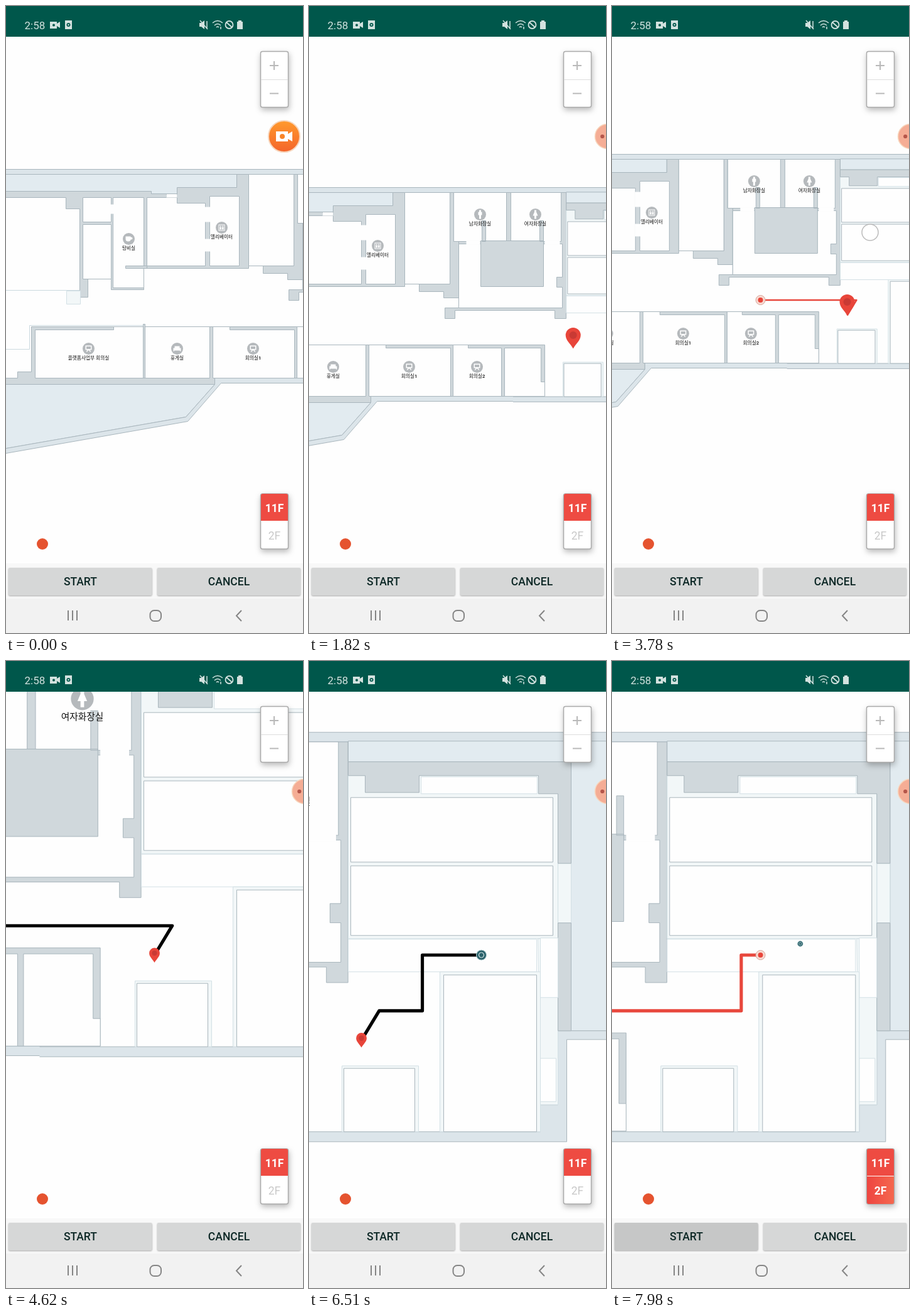
An HTML page that plays this animation: 473x1000 px, repeating every 8 s.

```html
<!DOCTYPE html>
<html lang="ko">
<head>
<meta charset="utf-8">
<title>Indoor route</title>
<style>
html, body { margin: 0; width: 100%; height: 100%; overflow: hidden; background: #fefefe; }
svg { display: block; width: 473px; height: 1000px; font-family: Roboto, "Noto Sans CJK KR", "Noto Sans CJK", sans-serif; }
#map path { vector-effect: non-scaling-stroke; stroke: #a9b6bd; stroke-width: 1; }
#map .wall { fill: #d0d8dc; }
#map .strip { fill: #dce5ea; }
#map .blue { fill: #e2ebf0; }
#map .pale { fill: #f2f7f8; stroke: #d3e0e5; }
#map .room { fill: #fefefe; }
#map .gap { fill: #fefefe; stroke: none; }
#map .thin { fill: none; stroke: #cbd9df; }
#map text { font-size: 7.7px; font-weight: 500; fill: #111; text-anchor: middle; }
.glyph { fill: #fff; }
#route { fill: none; stroke-width: 2.7; stroke-linejoin: round; }
.card { filter: drop-shadow(1px 4px 5px #0004); }
.mid { text-anchor: middle; }
.key { font-size: 17.5px; font-weight: 500; fill: #0d2826; }
.raised { filter: drop-shadow(0 1px 1px #0005); }
</style>
</head>
<body>
<svg viewBox="0 0 473 1000">
<defs>
  <linearGradient id="orange" x2="0" y2="1"><stop stop-color="#ff9a2e"/><stop offset="1" stop-color="#f4642a"/></linearGradient>
  <linearGradient id="lit"><stop stop-color="#ee4540"/><stop offset="1" stop-color="#f5684f"/></linearGradient>
  <path id="cup" d="M-5-4H3V-3Q6-3 6-1T3 1Q3 4-1 4T-5 0z"/>
  <path id="lift" d="M-5-5H5V5H-5zM-4-4V4H4V-4zM-3-1H-.5V3H-3zM.5-1H3V3H.5zM-2.5-3H-1V-1.5H-2.5zM1-3H2.5V-1.5H1z" fill-rule="evenodd"/>
  <path id="desk" d="M-5-5H5V2H2L4 5H2L1 3H-1L-2 5H-4L-2 2H-5zM-3.5-3.5V.5H3.5V-3.5z" fill-rule="evenodd"/>
  <path id="sofa" d="M-4-4H4V-1H6V4H4.500V3H-4.500V4H-6V-1H-4z"/>
  <path id="man" d="M-1.500-7H1.500V-4H3V1H1.500V7H-1.500V1H-3V-4H-1.500z"/>
  <path id="woman" d="M-1.500-7H1.500V-4L4 2H1.500V7H-1.500V2H-4L-1.500-4z"/>
</defs>

<g id="map">
  <g transform="translate(-280 -24)">
    <path class="blue" d="M-120 269H367V300H-120z"/>
    <path class="strip" d="M-120 261H930V269H-120z"/>
    <path class="wall" d="M-120 296H231V300H255V306H272V290H367V269H386V419H219V453H167V436H130V465H117V324H95V306H-120z"/>
    <path class="room" d="M122 306H167V345H122zM122 349H167V436H122zM170 306H219V450H170z"/>
    <path class="thin" d="M-120 454H117"/>
    <path class="room" d="M224 306H272V315H317V415H224zM324 304H371V415H324zM386 269H458V415H386z"/>
    <path class="gap" d="M316 321H325V345H316zM316 372H325V392H316zM255 301H272V306H255zM166 317H171V332H166z"/>
    <path class="wall" d="M190 415H224V419H190zM458 269H464V347H472V437H448V427H409V415H458z"/>
    <path class="pale" d="M96 455H118V476H96z"/>
    <path class="wall" d="M40 512H473V594H332V604H-120V594H18V584H40z"/>
    <path class="room" d="M46 517H171V512H218V594H46zM221 512H324V594H221zM329 512H356V517H459V594H329z"/>
    <path class="wall" d="M218 508H221V594H218z"/>
    <path class="thin" d="M-120 548H37V510H218"/>
    <path class="blue" d="M-120 604H332L286 656L-120 727z"/>
    <path class="strip" d="M560 594H332V604L286 656L-120 727V735L289 663L342 602H560"/>
  </g>

  <path class="wall" d="M184 245H363V446H345V433H186V446H170V429H192V323H184z"/>
  <path class="room" d="M184 245H268V323H184zM275 245H355V323H275zM192 327H357V380H348V396H357V429H192z"/>
  <path class="wall" d="M227 322H327V395H227zM229 290H235V323H229zM321 290H327V323H321z"/>
  <path class="gap" d="M204 322H226V328H204zM329 322H353V328H329z"/>
  <path class="wall" d="M183 488H329V570H183z"/>
  <path class="room" d="M183 488H207V493H260V570H183zM265 493H323V547H329V570H265z"/>

  <g transform="scale(.52356) translate(631.7 338.7)">
    <path class="blue" d="M62 128H417V161H62zM417 128H600V590H417z"/>
    <path class="strip" d="M-100 751H368V708H396V590H600V604H410V767H-100"/>
    <path class="pale" d="M62 183H396V443H62zM396 323H417V418H396zM364 443H396V708H368z"/>
    <path class="wall" d="M62 161H417V323H396V212H365V183H175V210H89V183H62zM396 418H417V590H396z"/>
    <path class="pale room" d="M178 185H363V212H178zM62 444H362V496H62zM368 442H396V537H368zM368 634H393V703H368z"/>
    <path class="room" d="M66 218H388V321H66zM66 327H388V438H66z"/>
    <path class="pale" d="M208 496H368V751H208zM52 646H174V751H52z"/>
    <path class="room" d="M214 501H362V751H214zM55 650H168V751H55z"/>
  </g>
  <g id="places"></g>
  <polyline id="route"/>
</g>

<g id="green">
  <circle r="8" fill="#2c636c" stroke="#b9d3d6"/><circle r="4" fill="none" stroke="#cfe2e2" stroke-width="1.200"/>
</g>
<g id="pin">
  <path d="M0 0C-3-6-10-11-10-18A10 10 0 0 1 10-18C10-11 3-6 0 0z" fill="#e8453a"/><circle cy="-18" r="5" fill="#c93a34"/>
</g>
<g id="walker" transform="translate(236.500 469)">
  <circle r="7.500" fill="#f8d9d1" stroke="#d5a79c"/><circle r="4" fill="#e8453a"/>
</g>

<circle cx="58" cy="858" r="9" fill="#e5532f"/>
<g class="card">
  <rect x="405.500" y="72.500" width="44" height="89" rx="3" fill="#fff" stroke="#aaa" stroke-width="1.500"/>
  <path d="M406 117.500H449" stroke="#ddd"/><path d="M420 95H434M427 88V102M420 139.500H434" stroke="#b9b9b9" stroke-width="2"/>
</g>
<g class="card mid" font-size="17.500">
  <rect x="405.500" y="778" width="44" height="88" rx="3" fill="#fff" stroke="#aaa" stroke-width="1.500"/>
  <path d="M406 821V781Q406 778 409 778H446Q449 778 449 781V821z" fill="#ee4b42"/>
  <path id="lower" d="M406 822H449V863Q449 866 446 866H409Q406 866 406 863z" fill="url(#lit)"/>
  <text x="427.500" y="807" font-weight="700" fill="#fff">11F</text>
  <text id="lowerText" x="427.500" y="851">2F</text>
</g>
<g id="recorder">
  <circle id="disc" r="25" stroke="#f7d6bd" stroke-width="2"/>
  <g id="camera"><path d="M-13-8H6V-4L13-8V8L6 4V8H-13z" fill="#fff"/><circle cx="-3" r="4" fill="#f98429"/></g>
  <circle id="dot" cx="-10" r="4" fill="#b5564a"/>
</g>

<path d="M0 889H473V945H0z" fill="#f8f8f8"/>
<g class="raised"><rect id="start" x="4" y="896" width="228.500" height="44" rx="2"/><rect x="241" y="896" width="228" height="44" rx="2" fill="#d6d7d7"/></g>
<text class="key mid" x="118.500" y="924">START</text><text class="key mid" x="355" y="924">CANCEL</text>
<path d="M0 945H473V1000H0z" fill="#f2f2f2"/>
<g id="nav" fill="none" stroke="#858585" stroke-width="2">
  <path d="M99 964V980M106 964V980M113 964V980M375 964L367 972.500L375 981"/><rect x="229.500" y="964" width="17.500" height="17" rx="6.500"/>
</g>

<path d="M0 0H473V49H0z" fill="#00574b"/>
<g fill="#d3e2df">
  <text x="29.500" y="37" font-size="17">2:58</text>
  <path d="M70 25H81V28L86 25V35L81 32V36H70zM94 23H105V37H94z"/>
  <circle cx="76" cy="30.500" r="2" fill="#00574b"/><circle cx="99.500" cy="30" r="3" fill="#00574b"/><circle cx="99.500" cy="30" r="1.200"/>
  <path d="M308 27H311L316 23V37L311 33H308zM368 25H370V23H375V25H377V37H368z"/>
  <path d="M309 23L321 37M320 24V36M329 27Q337 20 345 27M332 31Q337 26 342 31M335 34Q337 32 339 34M342 33V37" fill="none" stroke="#d3e2df" stroke-width="1.500"/>
  <circle cx="355.500" cy="30" r="6" fill="none" stroke="#d3e2df" stroke-width="1.800"/><path d="M351 26L360 34" stroke="#d3e2df" stroke-width="1.800"/>
</g>

<path id="dim" d="M0 0H473V1000H0z"/>
<g id="dialog">
  <rect class="card" x="31" y="391" width="411" height="211" rx="3" fill="#fafafa"/>
  <g fill="#222">
    <text x="59" y="439" font-size="24.800">출/도착지를 선택해주세요.</text>
    <text x="59" y="500" font-size="19.300">선택위치</text>
    <text id="spot" x="59" y="525" font-size="20"></text>
  </g>
  <g font-size="17" fill="#b32a46"><text x="293" y="573">출발지</text><text x="368" y="573">도착지</text></g>
</g>
<circle id="touch" r="13" fill="#fffc" stroke="#bcbcbc" stroke-width="1.500"/>
</svg>

<script>
const LOOP = 8000, ZOOM = 1.91, CENTER = [236.5, 469];
const $ = id => document.getElementById(id);
const clamp = v => Math.max(0, Math.min(1, v));
const set = (id, attrs) => { for (const k in attrs) $(id).setAttribute(k, attrs[k]); };
const show = (id, on) => set(id, { visibility: on ? 'visible' : 'hidden' });

// icon, label, centre on the map
const places = [
  ['cup', '탕비실', -85, 348], ['lift', '엘리베이터', 63, 330],
  ['desk', '플랫폼사업부 회의실', -149, 523], ['sofa', '휴게실', -8, 523],
  ['desk', '회의실1', 113, 523], ['desk', '회의실2', 221, 523],
  ['man', '남자화장실', 226, 280], ['woman', '여자화장실', 314, 280]
];
$('places').innerHTML = places.map(([icon, label, x, y]) =>
  `<g transform="translate(${x} ${y})"><circle r="9.5" fill="#b5b9bc"/><use class="glyph" href="#${icon}"/><text y="17.5">${label}</text></g>`).join('');

const walkA = [[-149, 500], [-149, 469.5], [389, 469.5], [374.2, 494]];
const preview = [[374.2, 494], [389, 469.5], [425, 469.5], [425, 423], [474.2, 423]];
const walkB = [[474.2, 423], [425, 423], [425, 469.5], [-16, 469.5]];

// time, map point at the centre, zoom
const cameraA = [[0, -44, 445.5, 1], [520, -44, 445.5, 1], [850, 190, 416.5, 1], [1850, 190, 416.5, 1], [2049, -149, 500, 1]];
const cameraB = [[4549, 374.2, 494, 1], [4610, 374.2, 494, ZOOM], [4900, 374.2, 494, ZOOM],
  [5300, 454.3, 423, ZOOM], [7650, 454.3, 423, ZOOM], [7720, 474.2, 423, ZOOM]];

const dialogs = [[200, 520, '2402, 1602'], [1000, 1700, '4494, 1538'], [5400, 6000, '5038, 1147']];
const touches = [[150, 270, 131, 535], [950, 1100, 421, 548], [3700, 3860, 411, 361], [5330, 5450, 274, 469]];

function tween(keys, t, ease = u => u) {
  const i = keys.findIndex(k => k[0] > t);
  if (i < 0) return keys[keys.length - 1].slice(1);
  if (!i) return keys[0].slice(1);
  const a = keys[i - 1], b = keys[i], u = ease((t - a[0]) / (b[0] - a[0]));
  return a.slice(1).map((v, j) => v + (b[j + 1] - v) * u);
}

// the part of a path still ahead after a given distance
function ahead(path, dist) {
  for (let i = 1; i < path.length; i++) {
    const [a, b] = [path[i - 1], path[i]], len = Math.hypot(b[0] - a[0], b[1] - a[1]);
    if (dist < len) return [a.map((v, j) => v + (b[j] - v) * dist / len), ...path.slice(i)];
    dist -= len;
  }
  return path.slice(-1);
}

function draw(t) {
  const first = t >= 2049 && t < 4549, second = t >= 7720, walking = first || second;
  const smooth = u => u * u * (3 - 2 * u);
  let line = [], cam;
  if (walking) {
    line = first ? ahead(walkA, (t - 2049) * .24) : ahead(walkB, (t - 7720) * .127);
    cam = [...line[0], first ? 1 : ZOOM];
  } else {
    cam = tween(t < 2049 ? cameraA : cameraB, t, smooth);
    if (t >= 4549) line = t < 6000 ? walkA : t < 7000 ? preview : walkB;
  }
  const s = cam[2], toScreen = (x, y) => [CENTER[0] + (x - cam[0]) * s, CENTER[1] + (y - cam[1]) * s];
  set('map', { transform: `translate(${toScreen(0, 0)}) scale(${s})` });
  set('route', { points: line.join(' '), stroke: walking ? '#e8473c' : '#000' });
  show('walker', walking);
  show('places', t < 7000);

  const late = t >= 6000, small = t >= 7650;
  const g = late ? toScreen(474.2, 423) : toScreen(-149, 511);
  if (small) g[1] -= 18;
  set('green', { transform: `translate(${g}) scale(${!late ? .62 : small ? .55 : 1})` });
  show('green', t >= 520);
  const p = toScreen(374.2, 494);
  if (t >= 4549) p[1] += 12;
  set('pin', { transform: `translate(${p}) scale(${t < 4549 ? 1.2 : .84})` });
  show('pin', t >= 1700 && t < 7000);

  const docked = t >= 900;
  const [x, r] = tween([[0, 443, 1], [700, 443, 1], [1050, 464, .78], [1500, 475, .78]], t);
  set('recorder', { transform: `translate(${x} 208) scale(${r})` });
  set('disc', { fill: docked ? '#f5ad95' : 'url(#orange)' });
  show('camera', !docked);
  show('dot', docked);

  show('lower', t >= 7000);
  set('lowerText', t >= 7000 ? { fill: '#fff', 'font-weight': 700 } : { fill: '#c9c9c9', 'font-weight': 400 });
  const pressed = t >= 1850 && t < 2050 || t >= 7600;
  set('start', { fill: pressed ? '#c6c7c7' : '#d6d7d7' });

  const open = dialogs.find(d => t >= d[0] && t < d[1]);
  const fade = open ? clamp(Math.min((t - open[0]) / 185, (open[1] - t) / 100)) : 0;
  set('dim', { opacity: fade * .5 });
  set('dialog', { opacity: clamp(fade * 2) });
  set('nav', { opacity: 1 - .75 * clamp(fade * 4) });
  if (open) $('spot').textContent = 'Location = ' + open[2];

  const tap = touches.find(d => t >= d[0] && t < d[1]);
  show('touch', tap);
  if (tap) set('touch', { cx: tap[2], cy: tap[3] });
}

const began = performance.now();
function tick() {
  draw((performance.now() - began) % LOOP);
  requestAnimationFrame(tick);
}
tick();
</script>
</body>
</html>
```
